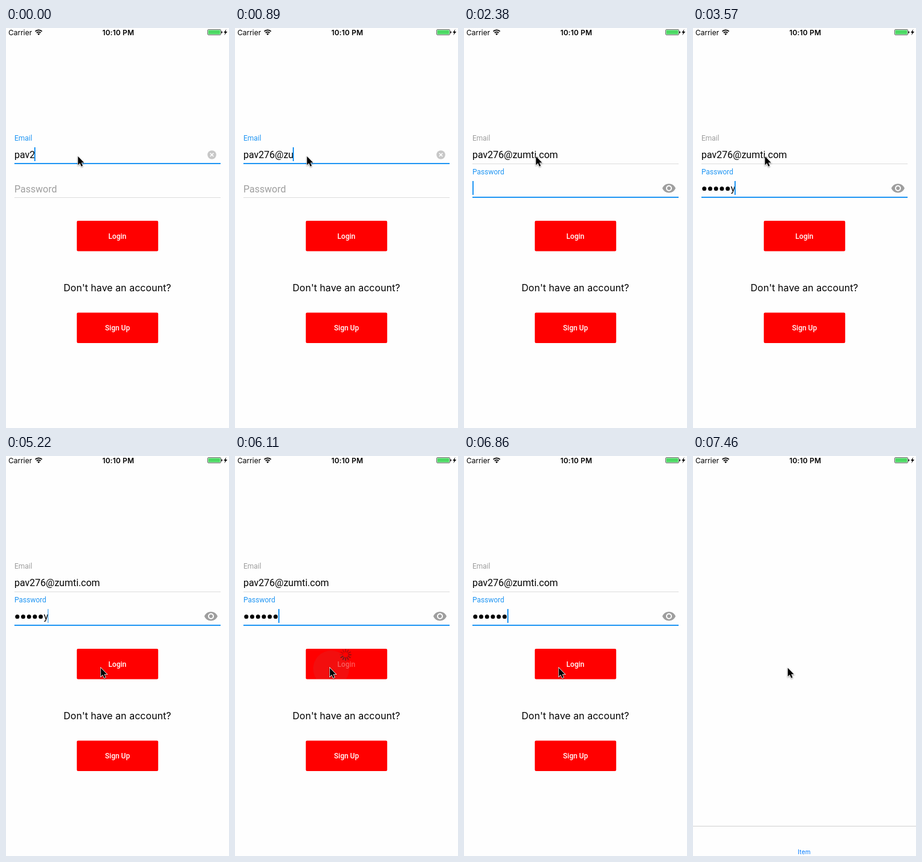
These frames come from a looping animation (371 by 664 pixels, 8 s). An HTML page:

```html
<!DOCTYPE html>
<html lang="en">
<head>
<meta charset="utf-8">
<title>Login form</title>
<style>
  html, body { margin: 0; width: 100%; height: 100%; overflow: hidden; background: #fefefe; }
  svg { display: block; width: 371px; height: 664px; }
  text { font-family: Roboto, sans-serif; font-size: 16px; white-space: pre; }
  .sys { font-family: Inter, sans-serif; }
  .small { font-size: 12px; }
  .mid { text-anchor: middle; }
  .btn { font-size: 12px; font-weight: 500; fill: #fff; text-anchor: middle; }
</style>
</head>
<body>
<svg viewBox="0 0 371 664">
  <defs>
    <clipPath id="clip"><rect x="118" y="320" width="135" height="50" rx="2"/></clipPath>
  </defs>

  <!-- status bar -->
  <text class="sys small" x="4" y="11.5">Carrier</text>
  <g fill="none" stroke="#000" stroke-width="1.8">
    <path d="M48.7 5.7a7.8 7.8 0 0 1 11.2 0M50.9 8a4.8 4.8 0 0 1 6.8 0"/>
    <path d="M54.3 12l-2-2.2a2.9 2.9 0 0 1 4 0z" fill="#000" stroke="none"/>
  </g>
  <text class="sys small mid" x="186.7" y="11.5" font-weight="600" letter-spacing=".15">10:10 PM</text>
  <rect x="335.5" y="2.5" width="22" height="9" rx="1.5" fill="none" stroke="#444" stroke-width=".8"/>
  <rect x="336.5" y="3.5" width="20" height="7" rx=".5" fill="#4cd964"/>
  <path d="M358.3 5.3a1.8 1.8 0 0 1 0 3.6z"/>
  <path d="M366.5 2l-4.3 5.7h2.6l-1.6 4.3 5-5.9h-2.8z"/>

  <g id="form">
    <text id="emailLabel" class="small" x="14" y="187">Email</text>
    <text id="email" x="14" y="216"></text>
    <rect id="emailLine" x="14" width="343"/>
    <g id="clear">
      <circle cx="342.5" cy="210.5" r="7.3" fill="#c7c7c7"/>
      <path d="M339.7 207.7l5.6 5.6m0-5.6l-5.6 5.6" stroke="#fff" stroke-width="1.6"/>
    </g>

    <text id="passLabel" x="14" y="272.5">Password</text>
    <g id="dots"></g>
    <text id="letter" y="272"></text>
    <rect id="passLine" x="14" width="343"/>
    <path id="eye" transform="translate(329 254)" fill="#9e9e9e" fill-rule="evenodd"
      d="M12 4.5C7 4.5 2.7 7.6 1 12c1.7 4.4 6 7.5 11 7.5s9.3-3.1 11-7.5c-1.7-4.4-6-7.5-11-7.5zM12 17a5 5 0 1 1 0-10 5 5 0 0 1 0 10zm0-8a3 3 0 1 0 0 6 3 3 0 0 0 0-6z"/>
    <rect id="caret" width="2" height="23" fill="#2196f3"/>

    <rect x="117.8" y="320" width="135.4" height="50.5" rx="2" fill="red"/>
    <circle id="ripple" cx="160" cy="353" fill="#888" clip-path="url(#clip)"/>
    <text id="login" class="btn" x="185.3" y="349.5">Login</text>
    <g id="spinner" transform="translate(184 330)" stroke-width="1.8" stroke-linecap="round"></g>

    <text class="sys mid" x="185.2" y="437" letter-spacing=".05">Don't have an account?</text>
    <rect x="117.8" y="472.4" width="135.4" height="50.5" rx="2" fill="red"/>
    <text class="btn" x="185.5" y="502">Sign Up</text>
  </g>

  <g id="tabs">
    <rect y="614" width="371" height="1" fill="#d0d0d0"/>
    <text class="sys mid" x="185" y="660.5" style="font-size:10px" letter-spacing=".2" fill="#007aff">Item</text>
  </g>

  <path id="mouse" d="M0 0V14.4L3.3 11.3 5.7 16.8 8 15.8 5.6 10.5H10.2Z" stroke="#fff" stroke-width="1.4"
    paint-order="stroke" style="filter:drop-shadow(0 1px 1px #0006)"/>
</svg>

<script>
const LOOP = 8000, TICK = 149.3, FIRST_TICK = 130;
const BLUE = '#2196f3', GREY = '#9e9e9e', PITCH = 9.75;
const EMAIL = 'pav276@zumti.com', PASS = 'galaxy';

// Key moments, in ticks
const FOCUS = 15, TYPE_PASS = 18, BLINK = 27, MOVE = 26, MASK = 37, PRESS = 40, LEAVE = 46;

const el = {};
document.querySelectorAll('[id]').forEach(e => el[e.id] = e);

const clamp = (v, lo = 0, hi = 1) => Math.min(hi, Math.max(lo, v));
const smooth = p => p * p * (3 - 2 * p);
const mix = (a, b, p) => a + (b - a) * p;

function set(node, attrs) {
  for (const k in attrs) node.setAttribute(k, attrs[k]);
}
function add(parent, tag, attrs) {
  set(parent.appendChild(document.createElementNS('http://www.w3.org/2000/svg', tag)), attrs);
}
for (let i = 0; i < 6; i++) add(el.dots, 'circle', { cx: 18.8 + PITCH * i, cy: 266.8, r: 3.5 });
for (let i = 0; i < 12; i++) add(el.spinner, 'path', { d: 'M0-5V-9', transform: `rotate(${i * 30})`, stroke: '#222' });

// Characters entered so far in a burst of typing that lasts some ticks
const burst = (n, start, ticks, chars) => Math.ceil(chars * clamp((n - start + 1) / ticks));

function setLine(node, y, focused) {
  set(node, { y: focused ? y - 1 : y, height: focused ? 2 : 1, fill: focused ? BLUE : '#dcdcdc' });
}

function drawFields(n) {
  const onPass = n >= FOCUS;
  const emailTyped = 4 + burst(n, 0, 2, 2) + burst(n, 3, 1, 1) + burst(n, 5, 4, 5) + burst(n, 10, 3, 4);
  el.email.textContent = EMAIL.slice(0, emailTyped);
  set(el.emailLabel, { fill: onPass ? GREY : BLUE });
  setLine(el.emailLine, 225, !onPass);
  set(el.clear, { opacity: onPass ? 0 : 1 });

  const typed = burst(n, TYPE_PASS, 6, 6);
  const hidden = n >= MASK ? typed : Math.max(0, typed - 1);
  [...el.dots.children].forEach((dot, i) => set(dot, { opacity: i < hidden ? 1 : 0 }));
  el.letter.textContent = PASS.slice(hidden, typed);
  set(el.letter, { x: 14 + PITCH * hidden });
  set(el.passLabel, { y: onPass ? 243 : 272.5, fill: onPass ? BLUE : GREY, class: onPass ? 'small' : '' });
  setLine(el.passLine, 281, onPass);
  set(el.eye, { opacity: onPass ? 1 : 0 });

  const width = onPass
    ? PITCH * hidden + (hidden < typed ? el.letter.getComputedTextLength() : 0)
    : el.email.getComputedTextLength();
  const phase = (n - BLINK) % 7;
  set(el.caret, {
    x: Math.max(14, Math.round(13 + width)),
    y: onPass ? 254 : 198,
    opacity: n < BLINK ? 1 : clamp(Math.abs(phase - 1.5) - 1)
  });
}

function drawLogin(n) {
  const since = n - PRESS;
  const label = clamp((Math.abs(since - 2) - 1.5) * .67);
  set(el.login, { opacity: label });
  set(el.spinner, { opacity: 1 - label });
  [...el.spinner.children].forEach((bar, i) =>
    set(bar, { opacity: 1 - .75 * ((2 * n - i + 24) % 12) / 11 }));
  set(el.ripple, {
    r: Math.max(0, 30 + 35 * since),
    opacity: since < 0 ? 0 : .1 * clamp(1 - since / 4)
  });
}

function draw() {
  const t = performance.now() % LOOP;
  const n = Math.floor((t - FIRST_TICK) / TICK);
  drawFields(n);
  drawLogin(n);
  const move = smooth(clamp((n - MOVE) / 5));
  set(el.mouse, { transform: `translate(${mix(119.7, 157.7, move)} ${mix(213, 351.7, move)})` });
  set(el.form, { display: n < LEAVE ? 'inline' : 'none' });
  set(el.tabs, { opacity: clamp((n - LEAVE) / 3) });
  requestAnimationFrame(draw);
}
draw();
</script>
</body>
</html>
```
